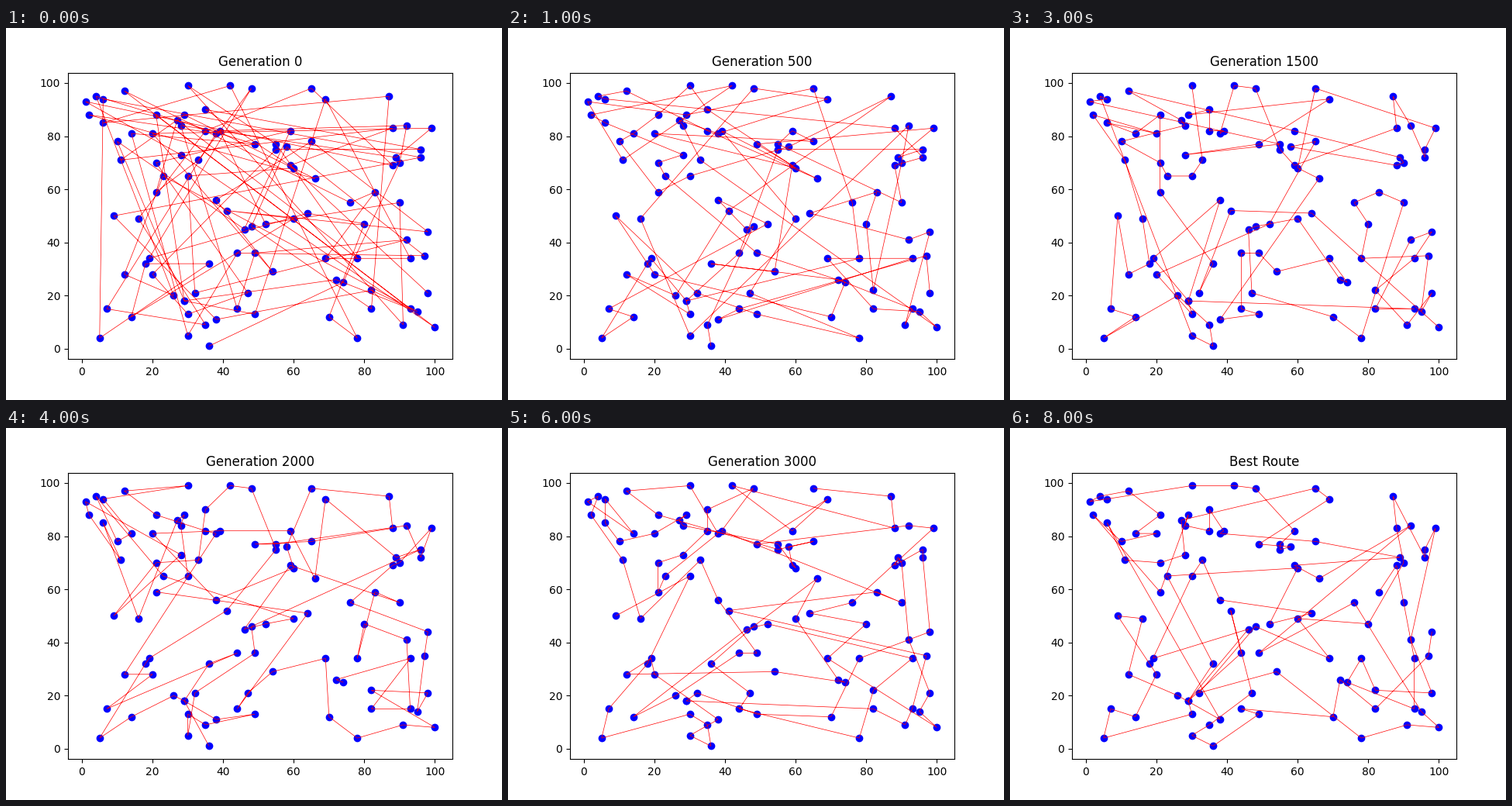
A matplotlib script for the animation above (8.5 s loop, 640 by 480 pixels).

```python
import math
import random

import matplotlib.pyplot as plt
from matplotlib.animation import FuncAnimation

FRAMES, INTERVAL, STEP = 17, 500, 250
POPULATION, SHAKES = 100, 12

random.seed(42)
cities = [(random.randint(1, 100), random.randint(1, 100)) for _ in range(100)]


def length(tour):
    return sum(map(math.dist, tour, tour[1:]))


def goal(gen):
    """Tour length that the search has reached by a generation."""
    return 1800 + 2700 * math.exp(-gen / 450)


def reverse_part(tour):
    a, b = sorted(random.sample(range(len(tour) + 1), 2))
    return tour[:a] + tour[a:b][::-1] + tour[b:]


def shake(tour):
    tour = tour[:]
    for _ in range(SHAKES):
        a, b = random.sample(range(len(tour)), 2)
        tour[a], tour[b] = tour[b], tour[a]
    return tour


def improve(tour, limit):
    """Keep every reversal that shortens the tour until it meets the limit."""
    best = length(tour)
    while best > limit:
        trial = reverse_part(tour)
        size = length(trial)
        if size < best:
            tour, best = trial, size
    return tour


population = [random.sample(cities, len(cities)) for _ in range(POPULATION)]
tours = [min(population, key=length)]
for i in range(1, FRAMES):
    tours.append(improve(shake(tours[-1]), goal(i * STEP)))

fig, ax = plt.subplots(figsize=(6.4, 4.8), dpi=100)
ax.scatter(*zip(*cities), color="blue")
route, = ax.plot([], [], color="red", linewidth=0.5)
ax.set_xlim(-3.95, 104.95)
ax.set_ylim(-3.9, 103.9)
title = ax.set_title("Generation 0")


def update(i):
    route.set_data(*zip(*tours[i]))
    last = i == FRAMES - 1
    title.set_text("Best Route" if last else f"Generation {i * STEP}")
    return route, title


anim = FuncAnimation(fig, update, frames=FRAMES, interval=INTERVAL, repeat=True)
plt.show()
```
